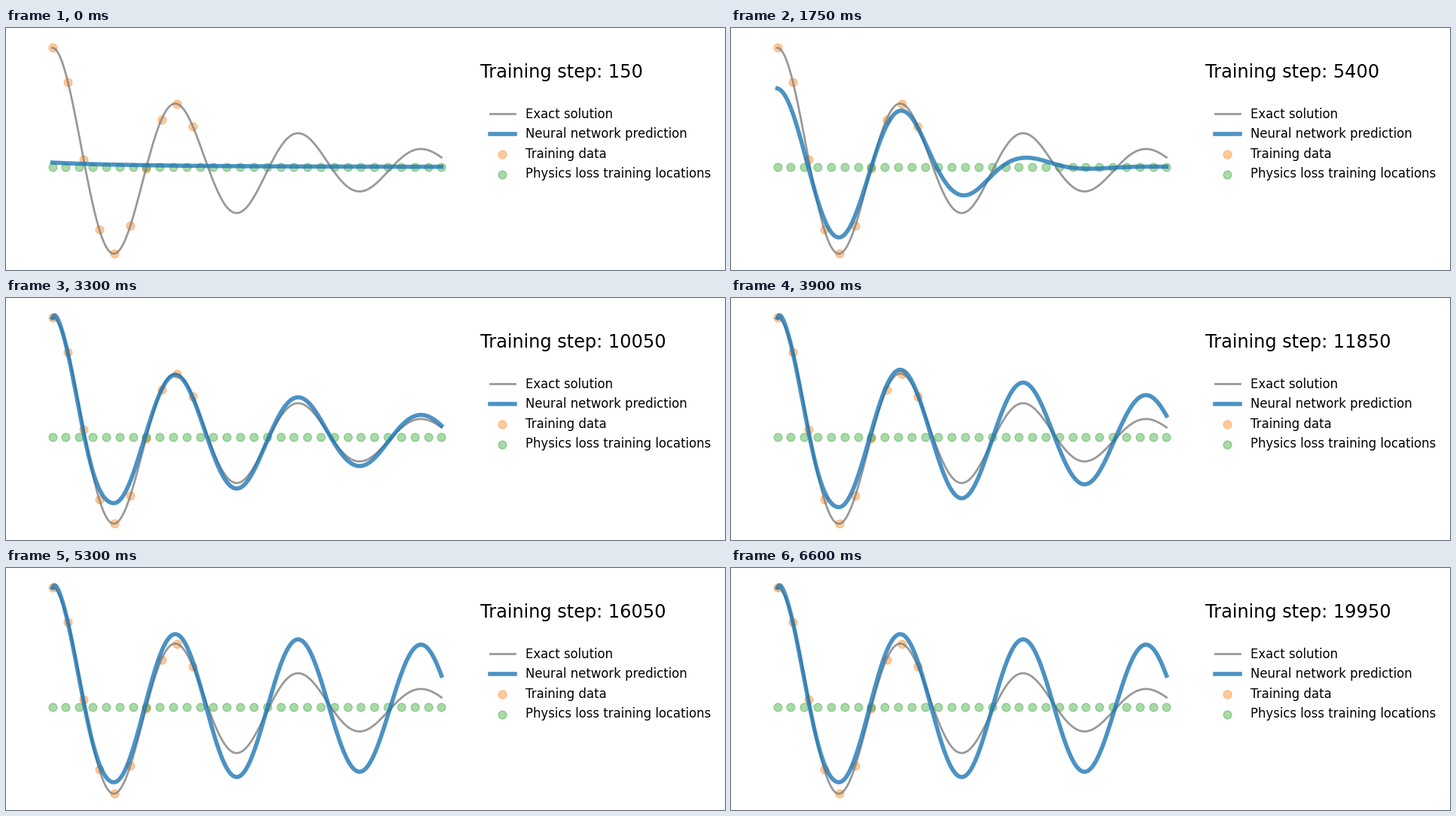
Recreate the animation shown at these times as a matplotlib script. Size 955x322 px, loop 6.65 s.

```python
import numpy as np
import matplotlib.pyplot as plt
from matplotlib.animation import FuncAnimation

W, H, DPI = 955, 322, 100
FRAMES, INTERVAL = 133, 50
X0, SPAN = 61.6, 516.8      # pixel of t = 0 and width of t in [0, 1]
BASE, UNIT = 184.8, 158.4   # pixel of u = 0 and height of u = 1
DAMP, FREQ = 2, np.sqrt(20**2 - 2**2)

t = np.linspace(0, 1, 500)
half_periods = t * FREQ / np.pi


def to_px(t, u):
    return X0 + SPAN * t, BASE - UNIT * u


def ease(i, start, end):
    s = np.clip((i - start) / (end - start), 0, 1)
    return s * s * (3 - 2 * s)


def logistic(i, mid, width):
    return 1 / (1 + np.exp((mid - i) / width))


def exact(t):
    wave = np.cos(FREQ * t) + DAMP / FREQ * np.sin(FREQ * t)
    return np.exp(-DAMP * t) * wave


def prediction(i):
    grow = logistic(i, 26.5, 2.4)   # the wave appears
    jump = ease(i, 40, 52)          # the start snaps onto the data
    settle = ease(i, 48, 102)       # the far lobes reach full height

    # height of each lobe; early on they fade out to the right
    k = np.arange(8)
    reach = 0.56 + 0.044 * i
    early = (0.61 * grow - 0.08 * jump) * np.exp(-((k - 1) / reach) ** 2)
    late = 0.655 - 0.022 * k
    lobes = early + (late - early) * settle
    lobes[0] = 0.8 * logistic(i, 26.5, 5.5) + 0.2 * jump
    lobes *= (-1.0) ** k

    # the young wave is stretched about its first trough
    stretch = 0.6 * (1 - grow)
    pos = (half_periods + stretch) / (1 + stretch)
    j = pos.astype(int)
    a, b = lobes[j], lobes[j + 1]
    phase = np.pi * (pos - j)
    u = (a - b) / 2 * np.cos(phase)
    u += (a + b) / 2 * (1 - 0.42 * np.sin(phase) ** 2)

    # initial slope, steeper first descent, small hook at the start
    u += 0.033 * np.exp(-t / 0.28 - i / 8)
    v = np.clip(half_periods, 0, 1)
    u -= (0.088 * jump - 0.044 * settle) * np.sin(np.pi * v**1.2) ** 2
    u += 0.032 * jump * v / 0.06 * np.exp(1 - v / 0.06)
    return u


plt.rcParams["font.family"] = "DejaVu Sans"
fig = plt.figure(figsize=(W / DPI, H / DPI), dpi=DPI, facecolor="white")
ax = fig.add_axes([0, 0, 1, 1])
ax.set_xlim(0, W)
ax.set_ylim(H, 0)
ax.axis("off")

t_data = t[0:200:20]
t_phys = np.linspace(0, 1, 30)

ax.plot(*to_px(t, exact(t)), color="grey", lw=2, alpha=0.8,
        label="Exact solution")
curve, = ax.plot(*to_px(t, prediction(0)), color="tab:blue", lw=4, alpha=0.8,
                 label="Neural network prediction")
ax.scatter(*to_px(t_data, exact(t_data)), s=60, color="tab:orange",
           alpha=0.4, label="Training data")
ax.scatter(*to_px(t_phys, 0 * t_phys), s=60, color="tab:green",
           alpha=0.4, label="Physics loss training locations")
ax.legend(loc=(636.4 / W, 112.5 / H), frameon=False, fontsize=11.875,
          handletextpad=0.85)
title = ax.text(630, 66, "", fontsize=17.28, color="black", va="baseline")


def update(i):
    curve.set_data(*to_px(t, prediction(i)))
    title.set_text(f"Training step: {150 * (i + 1)}")
    return curve, title


anim = FuncAnimation(fig, update, frames=FRAMES, interval=INTERVAL,
                     repeat=True, repeat_delay=0)
plt.show()
```
